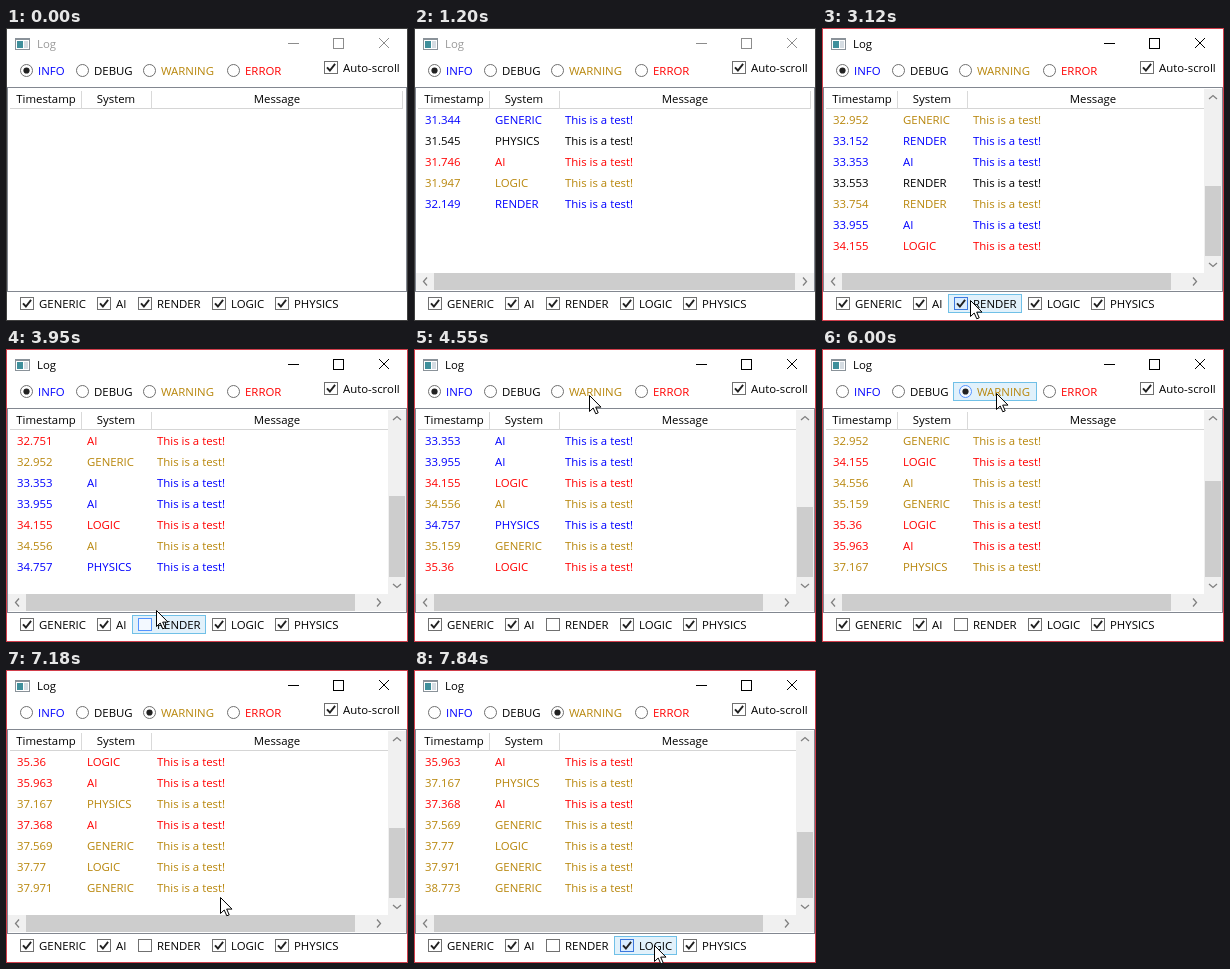
An HTML page for the animation above (8 s loop, 402x293 px).

```html
<!DOCTYPE html>
<html lang="en">
<head>
<meta charset="utf-8">
<title>Log</title>
<style>
  html, body { margin: 0; width: 100%; height: 100%; overflow: hidden; background: #fff; }
  svg { display: block; width: 402px; height: 293px; }
  text { font: 11.4px "Open Sans", "Noto Sans", sans-serif; white-space: pre; }
  .mid { text-anchor: middle; }
  .crisp { shape-rendering: crispEdges; }
</style>
</head>
<body>
<svg id="stage" viewBox="0 0 402 293" xmlns="http://www.w3.org/2000/svg">
  <defs>
    <linearGradient id="glow" x2="0" y2="1">
      <stop offset=".4" stop-color="#e3f7ff"/>
      <stop offset=".4" stop-color="#bcecfe"/>
    </linearGradient>
  </defs>
</svg>
<script>
const LOOP = 8000;
const CAPACITY = 7;
const COLORS = { I: '#0000ff', D: '#000', W: '#b8860b', E: '#ff0000' };
const RANK = 'IDWE';

// arrival in ms, timestamp, system, level
const LOG = `
350 31.344 GENERIC I
580 31.545 PHYSICS D
740 31.746 AI E
970 31.947 LOGIC W
1200 32.149 RENDER I
1340 32.35 GENERIC D
1500 32.551 AI E
1720 32.751 AI E
1900 32.952 GENERIC W
2080 33.152 RENDER I
2290 33.353 AI I
2520 33.553 RENDER D
2680 33.754 RENDER W
2820 33.955 AI I
3040 34.155 LOGIC E
3270 34.355 RENDER I
3430 34.556 AI W
3660 34.757 PHYSICS I
4030 35.159 GENERIC W
4250 35.36 LOGIC E
4640 35.763 GENERIC I
4770 35.963 AI E
5000 36.164 PHYSICS D
6000 37.167 PHYSICS W
6140 37.368 AI E
6380 37.569 GENERIC W
6520 37.77 LOGIC W
6740 37.971 GENERIC W
7540 38.773 GENERIC W`.trim().split('\n').map(line => {
  const [at, stamp, system, level] = line.split(' ');
  return { at: +at, stamp, system, level };
});

// time, x, y of the pointer tip
const POINTER = [
  [1560, 225, 288], [1720, 212, 287], [2080, 191, 286], [2220, 178, 281],
  [2380, 160, 275], [2520, 150, 273], [2820, 150, 273], [2900, 148, 272],
  [3880, 148, 272], [3950, 150, 262], [4100, 163, 170], [4250, 172, 78],
  [4390, 174, 54], [4550, 175, 46], [4770, 174, 44], [6450, 174, 44],
  [6600, 172, 66], [6740, 170, 91], [6880, 184, 150], [6960, 192, 180],
  [7100, 205, 210], [7300, 228, 252], [7460, 238, 271], [7620, 240, 275]
];

const EVENTS = {
  active: [3120, LOOP],
  renderHover: [2220, 4020],
  renderPress: [3120, 3350],
  renderOff: [3350, LOOP],
  warnHover: [4620, 6560],
  warnPress: [5000, 5140],
  warnOn: [5140, LOOP],
  headerHover: [[4250, 4390], [6600, 6800]],
  logicHover: [7460, LOOP],
  logicPress: [7840, LOOP]
};

const stage = document.getElementById('stage');

function set(node, attrs) {
  for (const key in attrs) node.setAttribute(key, attrs[key]);
  return node;
}
function add(tag, attrs, parent = stage) {
  return parent.appendChild(set(document.createElementNS(stage.namespaceURI, tag), attrs));
}
function box(x, y, width, height, fill, parent) {
  return add('rect', { x, y, width, height, fill, class: 'crisp' }, parent);
}
function frame(x, y, width, height, stroke, fill = 'none', parent) {
  return add('rect', { x: x + .5, y: y + .5, width: width - 1, height: height - 1, fill, stroke, class: 'crisp' }, parent);
}
function label(x, y, str, fill = '#000', cls = '') {
  const node = add('text', { x, y, fill, class: cls });
  node.textContent = str;
  return node;
}
function line(d, stroke, width = 1, parent) {
  return add('path', { d, fill: 'none', stroke, 'stroke-width': width }, parent);
}
function show(node, on) {
  node.style.display = on ? '' : 'none';
}

// hover and press looks shared by check boxes and radios
function tint(node, hover, press) {
  set(node, {
    stroke: press ? '#3c77dd' : hover ? '#5593ff' : '#707070',
    fill: press ? '#d9ecff' : hover ? '#f3f9ff' : '#fff'
  });
}
function hoverPlate(x, y, width, height) {
  return frame(x, y, width, height, '#70c0e7', '#e1f1fb');
}
function checkBox(x, y, str, gap = 19) {
  const square = frame(x, y, 14, 13, '#707070', '#fff');
  const tick = line(`M${x + 3} ${y + 6.3}l2.9 3.2 5.2-6.6`, '#212121', 1.9);
  label(x + gap, y + 11, str);
  return { square, tick };
}
function radio(x, str, color, textX) {
  const ring = add('circle', { cx: x, cy: 42.5, r: 6, fill: '#fff', stroke: '#707070' });
  const dot = add('circle', { cx: x, cy: 42.5, r: 3.1, fill: '#212121' });
  label(textX, 47, str, color);
  return { ring, dot };
}

box(0, 0, 402, 293, '#fff');

// title bar
box(9, 10, 15, 12, '#8a9299');
box(10, 12, 13, 9, '#fff');
box(11, 13, 6, 7, '#3f8f9b');
box(18, 13, 4, 7, '#d5dce2');
const title = label(31, 20, 'Log');
const buttons = add('g', {});
line('M282 15.5h11', 'currentColor', 1, buttons);
frame(327, 10, 11, 11, 'currentColor', 'none', buttons);
line('M373 10l10 10M383 10l-10 10', 'currentColor', 1, buttons);

// level radios
const warnPlate = hoverPlate(131, 33, 84, 19);
const info = radio(20.5, 'INFO', COLORS.I, 32);
const debug = radio(76.5, 'DEBUG', COLORS.D, 88);
const warn = radio(143.5, 'WARNING', COLORS.W, 155);
const error = radio(227.5, 'ERROR', COLORS.E, 239);
show(debug.dot, false);
show(error.dot, false);
checkBox(318, 33, 'Auto-scroll');

// list and header
frame(1, 59, 400, 205, '#828790', '#fff');
box(4, 80, 393, 1, '#d5d5d5');
for (const x of [75, 145, 396]) box(x, 63, 1, 18, '#d9d9d9');
const glow = frame(146, 61, 251, 20, '#69bbe3', 'url(#glow)');
label(40, 75, 'Timestamp', '#000', 'mid');
label(110, 75, 'System', '#000', 'mid');
label(271, 75, 'Message', '#000', 'mid');

const rows = Array.from({ length: CAPACITY }, (_, i) =>
  [11, 81, 151].map(x => label(x, 96 + 21 * i, '')));

// scroll bars
const hBar = add('g', {});
box(2, 245, 398, 17, '#f0f0f0', hBar);
const hThumb = box(20, 245, 329, 17, '#cdcdcd', hBar);
line('M13 249.5l-3.5 4 3.5 4', '#808080', 1.3, hBar);
const hRight = line('M-2 249.5l3.5 4-3.5 4', '#808080', 1.3, hBar);
const vBar = add('g', {});
box(382, 61, 18, 184, '#f0f0f0', vBar);
const vThumb = box(383, 78, 16, 150, '#cdcdcd', vBar);
line('M387 71l4-3.5 4 3.5M387 235l4 3.5 4-3.5', '#808080', 1.3, vBar);

// system check boxes
const renderPlate = hoverPlate(126, 266, 74, 19);
const logicPlate = hoverPlate(200, 266, 63, 19);
checkBox(14, 269, 'GENERIC');
checkBox(91, 269, 'AI');
const renderBox = checkBox(132, 269, 'RENDER');
const logicBox = checkBox(206, 269, 'LOGIC');
checkBox(269, 269, 'PHYSICS');

const edge = frame(0, 0, 402, 293, '#404040');
const pointer = add('path', {
  d: 'M.5 .5V16.5L4.2 13 6.8 18.8 9.2 17.8 6.7 12.1H12Z', fill: '#fff', stroke: '#000'
});

function during(name, t) {
  const spans = EVENTS[name];
  return (Array.isArray(spans[0]) ? spans : [spans]).some(([a, b]) => t >= a && t < b);
}

function pointerAt(t) {
  const next = POINTER.findIndex(p => p[0] > t);
  if (next < 0) return POINTER[POINTER.length - 1].slice(1);
  const [t0, x0, y0] = POINTER[next - 1];
  const [t1, x1, y1] = POINTER[next];
  const k = (t - t0) / (t1 - t0);
  return [Math.round(x0 + (x1 - x0) * k), Math.round(y0 + (y1 - y0) * k)];
}

function drawList(t, on) {
  const minRank = on.warnOn ? RANK.indexOf('W') : 0;
  const list = LOG.filter(e => e.at <= t && RANK.indexOf(e.level) >= minRank &&
    !(on.renderOff && e.system === 'RENDER'));
  const tail = list.slice(-CAPACITY);
  rows.forEach((cells, i) => {
    const e = tail[i];
    const words = e ? [e.stamp, e.system, 'This is a test!'] : ['', '', ''];
    cells.forEach((cell, c) => {
      if (cell.textContent !== words[c]) cell.textContent = words[c];
      if (e) set(cell, { fill: COLORS[e.level] });
    });
  });

  const overflow = list.length > CAPACITY;
  show(hBar, list.length > 0);
  show(vBar, overflow);
  set(hThumb, { width: overflow ? 329 : 361 });
  set(hRight, { transform: `translate(${overflow ? 373 : 391} 0)` });
  if (overflow) {
    const height = Math.round(151 * CAPACITY / list.length);
    set(vThumb, { y: 228 - height, height });
  }
}

function draw(t) {
  const on = {};
  for (const name in EVENTS) on[name] = during(name, t);

  set(edge, { stroke: on.active ? '#d13f4c' : '#404040' });
  set(title, { fill: on.active ? '#000' : '#999' });
  buttons.style.color = on.active ? '#000' : '#8c8c8c';

  show(warnPlate, on.warnHover);
  show(renderPlate, on.renderHover);
  show(logicPlate, on.logicHover);
  show(glow, on.headerHover);
  tint(warn.ring, on.warnHover, on.warnPress);
  tint(renderBox.square, on.renderHover, on.renderPress);
  tint(logicBox.square, on.logicHover, on.logicPress);
  show(info.dot, !on.warnOn);
  show(warn.dot, on.warnOn);
  show(renderBox.tick, !on.renderOff);

  drawList(t, on);

  const visible = t >= POINTER[0][0];
  show(pointer, visible);
  if (visible) set(pointer, { transform: `translate(${pointerAt(t).join(' ')})` });
}

const start = performance.now();
function tick() {
  draw((performance.now() - start) % LOOP);
  requestAnimationFrame(tick);
}
tick();
</script>
</body>
</html>
```
